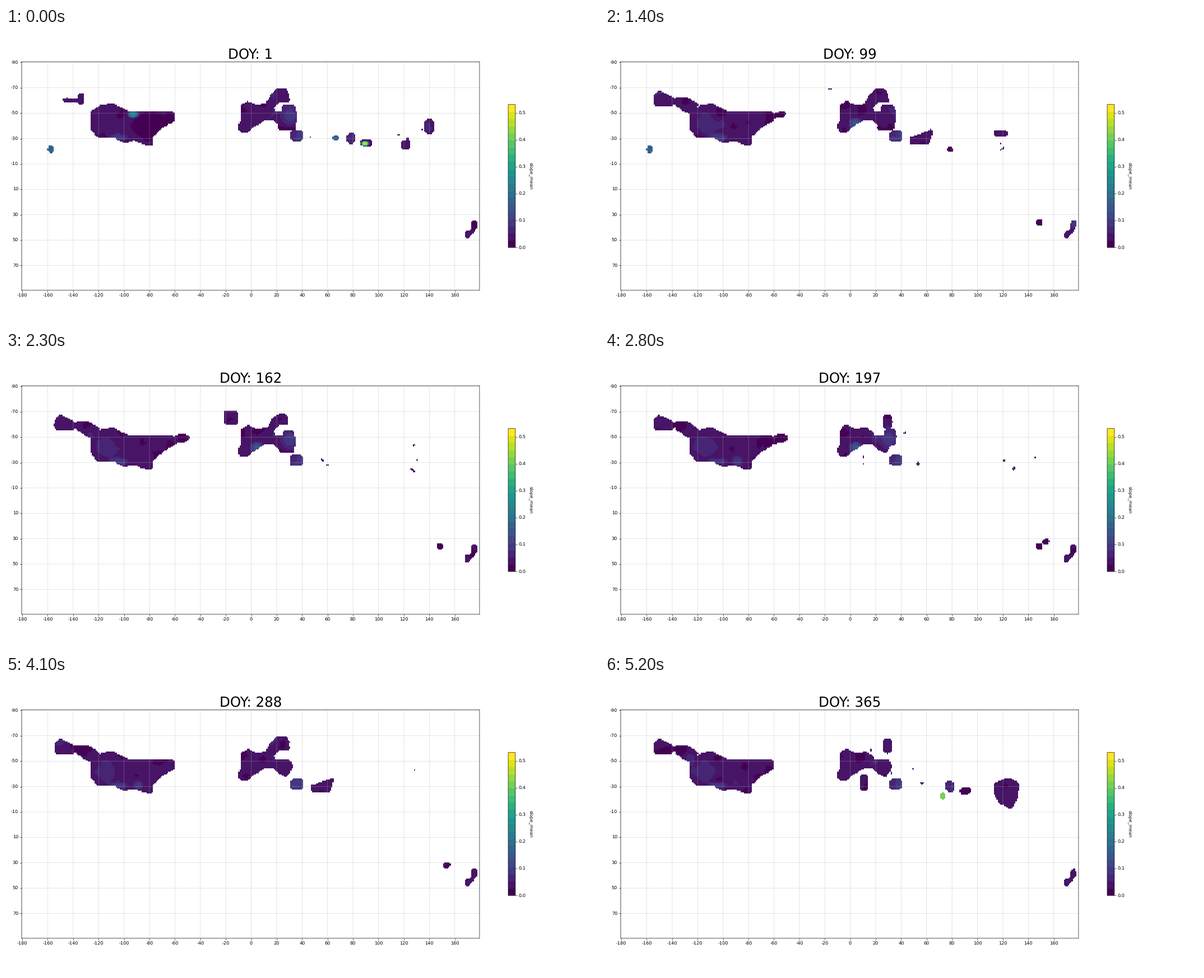
A matplotlib script that plays this animation: 1058 by 529 pixels, repeating every 5.3 s.

```python
import numpy as np
import matplotlib.pyplot as plt
from matplotlib.animation import FuncAnimation
from matplotlib.path import Path

W, H, DPI = 1058, 529, 64
PT = 58.8 / DPI                        # scale of one typographic unit
LEFT, TOP, CELL = 27.9, 60.25, 817 / 360
WEEKS, VMAX = 53, 0.532
ALWAYS = (0, WEEKS)

LON, LAT = np.meshgrid(np.arange(-180, 180), 90 - np.arange(180))
CELLS = np.column_stack([LON.ravel(), LAT.ravel()])


def blur(a, r):
    for axis in (0, 1, 0, 1):
        a = sum(np.roll(a, k, axis) for k in range(-r, r + 1)) / (2 * r + 1)
    return a


def noise(seed, r):
    n = blur(np.random.default_rng(seed).normal(size=LON.shape), r)
    return n / n.std()


def presence(week, spans):
    """1 inside a span of weeks, fading to 0 over two weeks on either side."""
    return max(np.clip(1 + min(week - a, b - week) / 2, 0, 1) for a, b in spans)


regions, spots = [], []
BASE = 0.038 + 0.007 * noise(4, 3)


def region(mask, slope, spans):
    regions.append((blur(mask.astype(float), 1), slope, spans or [ALWAYS]))


def land(*outline, slope=None, spans=None):
    """A landmass from a few (lon, lat) corners."""
    region(Path(outline).contains_points(CELLS, radius=1e-6).reshape(LON.shape),
           slope, spans)


def patch(lon, lat, rx, ry, *spans, slope=None):
    """A small blocky landmass around a centre."""
    region(((LON - lon) / rx) ** 4 + ((LAT - lat) / ry) ** 4 <= 1, slope, spans)


def spot(slope, lon, lat, rx, ry, *spans):
    """A local rise or dip of the slope."""
    d = ((LON - lon) / rx) ** 2 + ((LAT - lat) / ry) ** 2
    spots.append((np.exp(-d * d), slope, spans or [ALWAYS]))


# North America
land((-127, 51), (-119, 56), (-109, 58), (-97, 52), (-60, 51), (-60, 44), (-70, 38),
     (-77, 32), (-78, 24), (-84, 25), (-92, 28), (-100, 26), (-107, 30), (-121, 30),
     (-127, 38))
land((-139, 63), (-129, 63), (-118, 56), (-127, 49), (-138, 56), spans=[(7, 53)])
land((-155, 63), (-151, 68), (-138, 62), (-138, 56), (-154, 55), spans=[(7, 53)])
land((-62, 51), (-54, 53), (-47, 50), (-52, 46), (-64, 44), spans=[(15, 38)])
patch(-142, 60, 7, 1.6, (0, 5))
patch(-134, 61, 2.6, 5, (0, 5))
patch(-158, 21.5, 2.6, 2.6, (0, 16), slope=.17)

# Europe and western Asia
land((-9, 56), (-3, 60), (5, 56), (12, 58), (18, 54), (20, 45), (10, 44), (2, 39),
     (-2, 35), (-9, 34), (-11, 39), (-8, 46))
land((9, 54), (14, 64), (21, 70), (28, 69), (31, 58), (22, 58), (17, 53),
     spans=[(0, 22), (35, 48)])
land((16, 51), (30, 52), (33, 46), (28, 37), (23, 39), (17, 44))
land((24, 56), (34, 57), (36, 48), (34, 36), (20, 37), (22, 45), spans=[(0, 22)])
land((38, 62), (47, 62), (55, 46), (64, 39), (62, 26), (48, 26), (45, 34), (53, 38),
     (44, 50), (35, 52), spans=[(16, 21)])
land((46, 31), (58, 35), (65, 38), (62, 25), (46, 25), spans=[(8, 21), (34, 47)])
patch(-16, 65, 7, 7, (16, 22))
patch(29, 62, 4, 6, (25, 31), (51, 53))
patch(31, 50, 5, 7, (25, 31))
patch(10.5, 33, 3.5, 7, (51, 53))
patch(35.5, 32, 5, 4.5, slope=.08)
patch(41, 31, 9, 4, (44, 47), slope=.09)
patch(50, 44, 3.5, 3, (7, 11), slope=.01)

# Southern and eastern Asia
patch(66, 30.5, 3, 2.3, (0, 4), slope=.15)
patch(78, 30, 3.6, 4.5, (0, 12), (43, 53), slope=.07)
patch(72.5, 22.5, 2.4, 3, (43, 53), slope=.42)
patch(78, 21.5, 2.4, 2.4, (8, 21), slope=.01)
patch(90, 26.5, 4.6, 2.9, (0, 11), (43, 53), slope=.015)
patch(97, 26, 8, 3.3, (7, 11), slope=.01)
patch(121, 25, 3.4, 4, (0, 12), (43, 48), slope=.03)
patch(112.5, 35.5, 1.8, 5, (7, 11), (44, 48))
patch(118, 34, 7, 4, (15, 20))
patch(139.5, 39.5, 3.8, 6, (0, 12))
land((125, 48), (138, 46), (153, 38), (146, 26), (139, 24), (135, 30), (124, 36),
     spans=[(6, 12)])
land((112, 33), (124, 37), (133, 33), (131, 20), (126, 12), (117, 16), (112, 25),
     spans=[(51, 53)])

# Oceania
patch(148, -36, 2.8, 3, (7, 38), slope=.01)
patch(153.5, -32, 3, 2.2, (26, 47), slope=.01)
land((167, -43), (172, -42), (173, -35), (178, -34), (178, -39), (171, -48), (167, -49))

spot(.013, -80, 40, 15, 12, (0, 11))
spot(.013, -134, 59, 6, 5, (26, 53))
spot(.25, -93, 49, 4, 2.5, (0, 2))
spot(.19, -105, 30, 6, 3, (15, 22))
spot(.09, -105, 31, 8, 3)
spot(.09, -89, 31, 4, 4, (27, 47))
spot(.065, -114, 42, 8, 9, (6, 53))
spot(.10, -150, 60, 6, 5, (16, 20))
spot(.08, -125, 58, 5, 4, (7, 11))
spot(.14, 4, 42, 5, 4, (8, 31))
spot(.085, 30, 48, 7, 8, (0, 4), (16, 36))
spot(.30, 77, 30, 3, 4, (8, 10))
spot(.47, 89, 26, 3, 2, (0, 2))
spot(.09, 176, -37, 4, 4, (8, 21))


def slope(week):
    """Slope of the cells measured in a week, NaN elsewhere."""
    value = BASE + 0.006 * noise(200 + week, 3)
    shown = np.zeros(LON.shape, bool)
    ragged = 0.5 + 0.05 * noise(100 + week, 1)
    for field, level, spans in regions:
        area = field > ragged + 0.6 * (1 - presence(week, spans))
        if level is not None:
            value[area & ~shown] += level - 0.038
        shown |= area
    for shape, level, spans in spots:
        value += (level - value) * shape * presence(week, spans)
    return np.where(shown, np.clip(value, 0, VMAX), np.nan)


plt.rcParams.update({
    "font.family": "DejaVu Sans", "font.size": 10 * PT,
    "path.snap": False, "text.hinting": "none",
    "axes.linewidth": .8 * PT, "grid.linewidth": .8 * PT,
})
for axis in ("xtick", "ytick"):
    plt.rcParams.update({f"{axis}.major.width": .8 * PT,
                         f"{axis}.major.size": 3.5 * PT,
                         f"{axis}.major.pad": 3.5 * PT})

fig = plt.figure(figsize=(W / DPI, H / DPI), dpi=DPI, facecolor="white")


def box(x, y, w, h):
    return fig.add_axes([x / W, 1 - (y + h) / H, w / W, h / H])


ax = box(LEFT, TOP, CELL * 360, CELL * 180)
image = ax.imshow(slope(0), cmap=plt.get_cmap("viridis", 20), vmin=0, vmax=VMAX,
                  extent=(-180.5, 179.5, 89.5, -90.5), aspect="auto",
                  interpolation="nearest")
lons, lats = range(-180, 180, 20), range(-90, 90, 20)
ax.set_xticks(lons, [str(v) for v in lons])
ax.set_yticks(lats, [str(v) for v in lats])
ax.grid(alpha=.5)
title = ax.set_title("", fontsize=30 * PT, pad=6 * PT)

bar = fig.colorbar(image, cax=box(896, 136.7, 12.8, 255.7))
bar.set_ticks(np.arange(6) / 10)
fig.text(936.5 / W, .5, "slope_mean", rotation=270, ha="center", va="center")


def draw(week):
    image.set_data(slope(week))
    title.set_text(f"DOY: {1 + 7 * week}")
    return image, title


anim = FuncAnimation(fig, draw, frames=WEEKS, interval=100, repeat=True)
plt.show()
```
